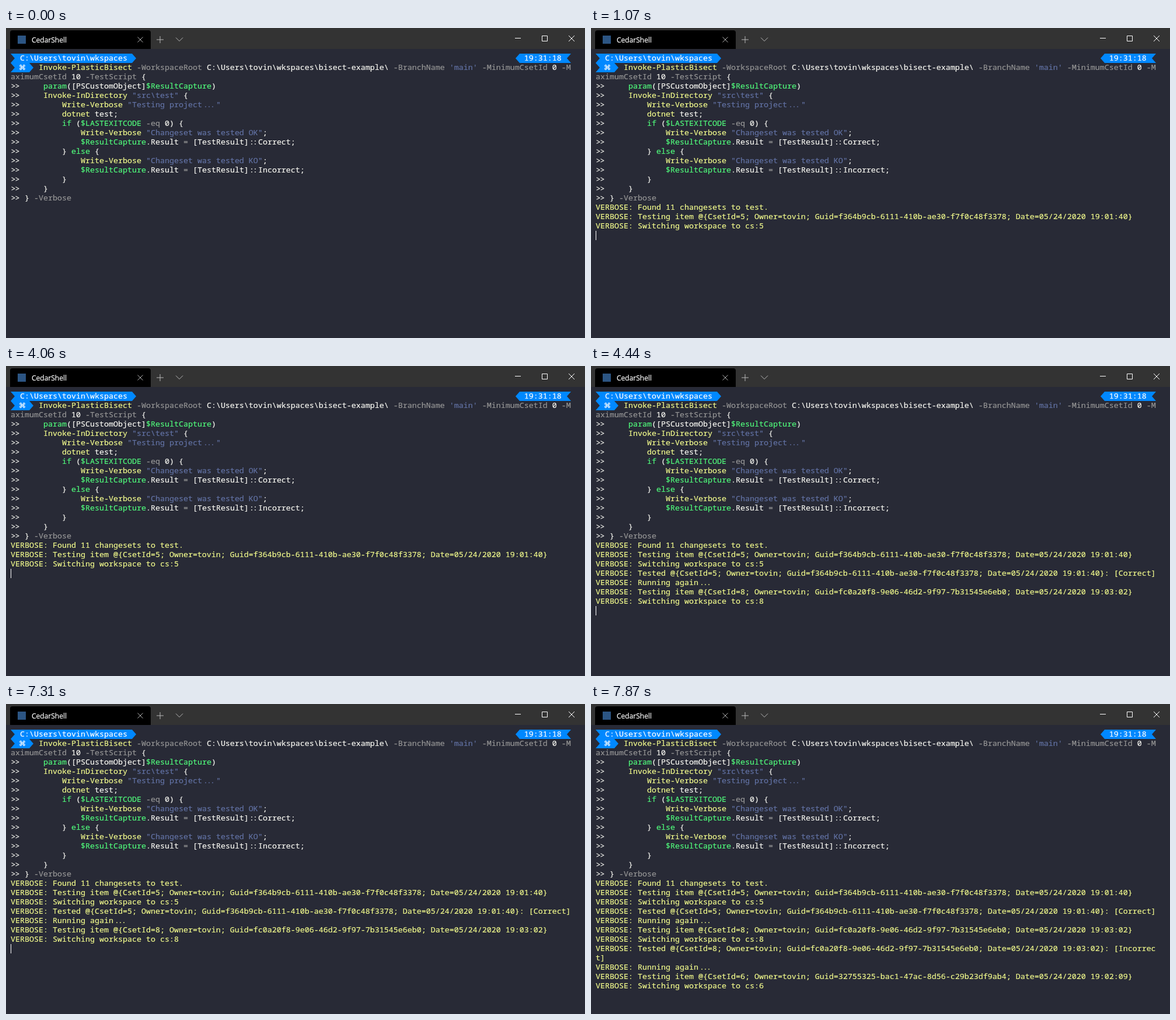
Animation, 992 px wide and 532 px high, one loop 8 s. Source, as an HTML page:

```html
<!DOCTYPE html>
<html lang="en">
<head>
<meta charset="utf-8">
<title>Terminal</title>
<style>
html, body { margin: 0; width: 100%; height: 100%; overflow: hidden; background: #282a36; }
.stage { position: relative; width: 992px; height: 532px; overflow: hidden; }
svg { position: absolute; left: 0; top: 0; }
.title {
  position: absolute; left: 44px; top: 12px; color: #fff;
  font: 12px/18px "Open Sans", sans-serif; -webkit-text-stroke: .2px;
}

.log {
  position: absolute; left: 8px; top: 43px; width: 976px; margin: 0; overflow: hidden;
  font: 500 13.3333px/16px "Noto Sans Mono", monospace; color: #f8f8f2;
  -webkit-text-stroke: .2px;
  animation: output 8s step-end infinite;
}
.mark {
  position: absolute; left: 20px; top: 60px; width: 16px; text-align: center; color: #fff;
  font: 12px/16px "DejaVu Sans", sans-serif; -webkit-text-stroke: .3px;
}
.on { color: #fff; }
.y { color: #f1fa8c; }
.g { color: #50fa7b; }
.s { color: #6272a4; }
.p { color: #959595; }

/* Tightened pairs and triples that still fill whole cells */
.t2, .t3, .cc {
  letter-spacing: calc(-1px * var(--d));
  padding: 0 calc((var(--n) + 1) * var(--d) * .5px) 0 calc((var(--n) - 1) * var(--d) * .5px);
}
.t2 { --n: 2; --d: 1; }
.t3 { --n: 3; --d: 2; }
.cc { --n: 2; --d: 2; }

.cursor {
  position: absolute; left: 8px; top: 44px; width: 1px; height: 16px; background: #fff;
  animation: cursor 8s step-end infinite;
}

/* One line is 16px; 1px extra keeps descenders whole */
@keyframes output {
  0% { height: 257px; }
  13.375% { height: 305px; }
  55.5% { height: 369px; }
  96.75% { height: 401px; }
  97.375%, 100% { height: 449px; }
}
@keyframes cursor {
  0% { opacity: 0; transform: translate(104px, 240px); }
  4.75% { opacity: 1; transform: translate(104px, 240px); }
  10.875% { opacity: 1; transform: translate(0, 256px); }
  13.375% { opacity: 1; transform: translate(0, 304px); }
  17.25% { opacity: 0; transform: translate(0, 304px); }
  23.625% { opacity: 1; transform: translate(0, 304px); }
  30.625% { opacity: 0; transform: translate(0, 304px); }
  37% { opacity: 1; transform: translate(0, 304px); }
  44% { opacity: 0; transform: translate(0, 304px); }
  50.75% { opacity: 1; transform: translate(0, 304px); }
  55.5% { opacity: 1; transform: translate(0, 368px); }
  57.75% { opacity: 0; transform: translate(0, 368px); }
  64.25% { opacity: 1; transform: translate(0, 368px); }
  71.25% { opacity: 0; transform: translate(0, 368px); }
  78.25% { opacity: 1; transform: translate(0, 368px); }
  85% { opacity: 0; transform: translate(0, 368px); }
  91.375% { opacity: 1; transform: translate(0, 368px); }
  96.75% { opacity: 1; transform: translate(0, 400px); }
  97.375% { opacity: 1; transform: translate(0, 448px); }
  98.375%, 100% { opacity: 0; transform: translate(0, 448px); }
}
</style>
</head>
<body>
<div class="stage">
  <svg width="992" height="532" viewBox="0 0 992 532" fill="none">
    <path fill="#333" d="M0 0H992V36H0z"/>
    <path fill="#000" d="M7 36V8q0-4 4-4H244q4 0 4 4V36z"/>
    <path fill="#2c5583" d="M20 13h14v14h-14z"/>
    <path stroke="#b0b0b0" d="M225.5 15.5l9 9m0-9l-9 9"/>
    <path stroke="#b8b8b8" d="M258 20h12M264 14v12M291 16.5l6 6 6-6"/>
    <path stroke="#fff" d="M872 17.5h10M918.5 13.5h9v9h-9zM964 13l10 10m0-10l-10 10"/>
    <g fill="#0088ff">
      <path d="M8 44H216L223 52 216 60H8L15 52z"/>
      <path d="M8 60H40L47 68 40 76H8L15 68z"/>
      <path d="M968 44H880L873 52 880 60H968L961 52z"/>
    </g>
  </svg>
  <div class="title">CedarShell</div>
  <div class="mark">⌘</div>
<pre class="log">
<span class="on">  C:\Users\tovin\wkspaces                                                                                     19:31:18</span>
      <span class="y">Invoke-PlasticBisect</span> <span class="p">-WorkspaceRoot</span> C:\Users\tovin\wkspaces\bisect-example\ <span class="p">-BranchName</span> <span class="s">'main'</span> <span class="p">-MinimumCsetId</span> 0 <span class="p">-M
aximumCsetId</span> 10 <span class="p">-TestScript</span> {
<span class="t2">&gt;&gt;</span>     <span class="g">param</span>([PSCustomObject]<span class="g">$ResultCapture</span>)
<span class="t2">&gt;&gt;</span>     <span class="y">Invoke-InDirectory</span> <span class="s">"src\test"</span> {
<span class="t2">&gt;&gt;</span>         <span class="y">Write-Verbose</span> <span class="s">"Testing project<span class="t3">...</span>"</span>
<span class="t2">&gt;&gt;</span>         <span class="y">dotnet</span> test;
<span class="t2">&gt;&gt;</span>         <span class="g">if</span> (<span class="g">$LASTEXITCODE</span> <span class="p">-eq</span> 0) {
<span class="t2">&gt;&gt;</span>             <span class="y">Write-Verbose</span> <span class="s">"Changeset was tested OK"</span>;
<span class="t2">&gt;&gt;</span>             <span class="g">$ResultCapture</span>.Result <span class="p">=</span> [TestResult]<span class="cc">::</span>Correct;
<span class="t2">&gt;&gt;</span>         } <span class="g">else</span> {
<span class="t2">&gt;&gt;</span>             <span class="y">Write-Verbose</span> <span class="s">"Changeset was tested KO"</span>;
<span class="t2">&gt;&gt;</span>             <span class="g">$ResultCapture</span>.Result <span class="p">=</span> [TestResult]<span class="cc">::</span>Incorrect;
<span class="t2">&gt;&gt;</span>         }
<span class="t2">&gt;&gt;</span>     }
<span class="t2">&gt;&gt;</span> } <span class="p">-Verbose</span>
<span class="y">VERBOSE: Found 11 changesets to test.
VERBOSE: Testing item @{CsetId=5; Owner=tovin; Guid=f364b9cb-6111-410b-ae30-f7f0c48f3378; Date=05/24/2020 19:01:40}
VERBOSE: Switching workspace to cs:5
VERBOSE: Tested @{CsetId=5; Owner=tovin; Guid=f364b9cb-6111-410b-ae30-f7f0c48f3378; Date=05/24/2020 19:01:40}: [Correct]
VERBOSE: Running again<span class="t3">...</span>
VERBOSE: Testing item @{CsetId=8; Owner=tovin; Guid=fc0a20f8-9e06-46d2-9f97-7b31545e6eb0; Date=05/24/2020 19:03:02}
VERBOSE: Switching workspace to cs:8
VERBOSE: Tested @{CsetId=8; Owner=tovin; Guid=fc0a20f8-9e06-46d2-9f97-7b31545e6eb0; Date=05/24/2020 19:03:02}: [Incorrec
t]
VERBOSE: Running again<span class="t3">...</span>
VERBOSE: Testing item @{CsetId=6; Owner=tovin; Guid=32755325-bac1-47ac-8d56-c29b23df9ab4; Date=05/24/2020 19:02:09}
VERBOSE: Switching workspace to cs:6</span>
</pre>
  <div class="cursor"></div>
</div>
</body>
</html>
```
